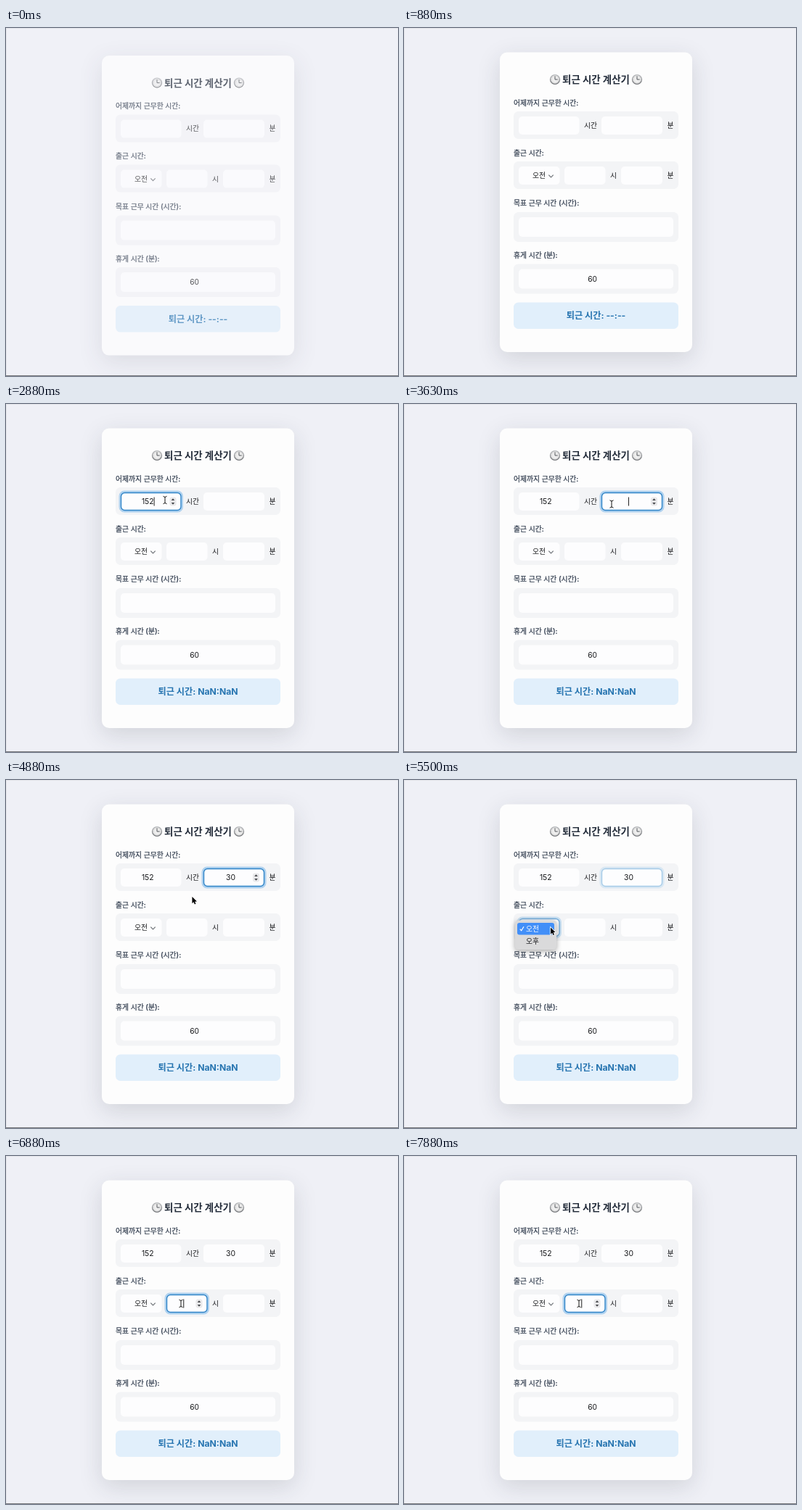
An HTML page with a canvas for the animation above (8 s loop, 540 by 480 pixels).

```html
<!DOCTYPE html>
<html lang="ko">
<head>
<meta charset="utf-8">
<style>
html, body { margin: 0; width: 540px; height: 480px; overflow: hidden; background: #eff0f6; }
canvas { display: block; }
</style>
</head>
<body>
<canvas id="stage" width="540" height="480"></canvas>
<script>
const c = document.getElementById('stage').getContext('2d');
const LOOP = 8000, STEP = 125;
const BG = '#eff0f6', INK = '#17181b', FIELD = '#fdfdfe';
const FAMILY = 'Inter, "Noto Sans CJK KR", "Noto Sans CJK", sans-serif';

// x, y, width, height; focus and blur times; [time, text] keystrokes
const days = { x: 158, y: 122, w: 83.5, h: 25, on: 1750, off: 3250, keys: [[2250, '1'], [2375, '15'], [2500, '152']] };
const mins = { x: 272, y: 122, w: 84, h: 25, on: 3250, off: 5375, keys: [[3875, '3'], [4125, '30']] };
const half = { x: 158, y: 191, w: 56.5, h: 25, on: 5375, off: 6625 };
const hour = { x: 221, y: 191, w: 56.5, h: 25, on: 6625, off: 9000, keys: [] };
const startMin = { x: 299, y: 191, w: 57, h: 25 };
const goal = { x: 158, y: 261, w: 213, h: 27 };
const rest = { x: 158, y: 332.5, w: 213, h: 27 };
const fields = [days, mins, half, hour, startMin, goal, rest];
const numeric = [days, mins, hour];
const MENU_OPEN = 5375, MENU_SHUT = 6250;

// pointer stops: time, x, y
const path = [
  [1000, 76, -16], [1125, 91, 2], [1625, 219, 132.5], [2875, 219, 132.5], [3250, 286, 138],
  [4625, 286, 138], [5250, 202, 203.5], [6250, 202, 203.5], [6500, 241, 203.5], [8000, 241, 203.5]
];

const clamp = v => Math.max(0, Math.min(1, v));
const ease = v => v * v * (3 - 2 * v);

function box(x, y, w, h, r, fill) {
  c.beginPath();
  c.roundRect(x, y, w, h, r);
  c.fillStyle = fill;
  c.fill();
}

function line(points, color, width) {
  c.beginPath();
  points.forEach(([x, y]) => c.lineTo(x, y));
  c.strokeStyle = color;
  c.lineWidth = width;
  c.stroke();
}

// y is the vertical middle of the glyphs
function text(s, x, y, size, color, weight = 400, align = 'center') {
  c.font = `${weight} ${size}px ${FAMILY}`;
  c.textAlign = align;
  c.fillStyle = color;
  c.fillText(s, x, y + size * 0.365);
}

function shadow(color, blur, dy) {
  c.shadowColor = color;
  c.shadowBlur = blur;
  c.shadowOffsetY = dy;
}

function clock(x, y) {
  const rim = c.createLinearGradient(x, y - 7, x, y + 7);
  rim.addColorStop(0, '#b9bbbe');
  rim.addColorStop(1, '#6c6e72');
  c.beginPath();
  c.arc(x, y, 7.1, 0, 7);
  c.fillStyle = rim;
  c.fill();
  c.beginPath();
  c.arc(x, y, 5.8, 0, 7);
  c.fillStyle = '#eeeeee';
  c.fill();
  for (let i = 0; i < 12; i++) {
    const a = i * Math.PI / 6;
    c.fillStyle = '#aaa';
    c.fillRect(x + 4.7 * Math.cos(a) - 0.4, y + 4.7 * Math.sin(a) - 0.4, 0.8, 0.8);
  }
  line([[x, y - 4.6], [x, y], [x + 3.6, y]], '#55585d', 1);
}

function ring(f, t) {
  const a = clamp((t - f.on) / 200) * (1 - clamp((t - f.off) / 200));
  if (!a) return;
  c.globalAlpha = a;
  c.beginPath();
  c.roundRect(f.x - 1, f.y - 1, f.w + 2, f.h + 2, 6);
  c.strokeStyle = 'rgba(66,153,225,.38)';
  c.lineWidth = 3;
  c.stroke();
  c.beginPath();
  c.roundRect(f.x + 0.5, f.y + 0.5, f.w - 1, f.h - 1, 5);
  c.strokeStyle = '#2f84c8';
  c.lineWidth = 1.4;
  c.stroke();
  c.globalAlpha = 1;
}

function spinner(f) {
  const x = f.x + f.w - 11.5, y = f.y + f.h / 2;
  box(x - 4.5, y - 6, 9, 12, 3, '#e9e9eb');
  for (const d of [-1, 1]) {
    c.beginPath();
    c.moveTo(x - 2.3, y + d * 1.5);
    c.lineTo(x + 2.3, y + d * 1.5);
    c.lineTo(x, y + d * 4.2);
    c.fillStyle = '#44464a';
    c.fill();
  }
}

function numberField(f, t, p) {
  const cx = f.x + f.w / 2 - 4.5, cy = f.y + f.h / 2;
  const typed = f.keys.filter(k => k[0] <= t).pop();
  const value = typed ? typed[1] : '';
  text(value, cx, cy, 10.4, INK);
  const active = t >= f.on && t < f.off;
  if (active || inside(f, p)) spinner(f);
  if (active && (t - (typed ? typed[0] : f.on)) % 1000 < 500) {
    const x = cx + (value ? c.measureText(value).width / 2 + 0.5 : 0);
    line([[x, cy - 6], [x, cy + 6]], '#222', 1);
  }
}

function inside(f, p) {
  return p && p.x > f.x && p.x < f.x + f.w && p.y > f.y && p.y < f.y + f.h;
}

function pointer(t) {
  const i = path.findIndex(k => k[0] > t);
  if (i < 1) return null;
  const [t0, x0, y0] = path[i - 1], [t1, x1, y1] = path[i];
  const k = ease((t - t0) / (t1 - t0));
  return { x: x0 + (x1 - x0) * k, y: y0 + (y1 - y0) * k };
}

function drawPointer({ x, y }, beam) {
  if (beam) {
    const stem = [[x, y - 4], [x, y + 4]];
    line(stem, '#fff', 2.4);
    line(stem, '#111', 1);
    for (const d of [-1, 1])
      line([[x - 2.5, y + d * 5.2], [x, y + d * 4], [x + 2.5, y + d * 5.2]], '#111', 1);
    return;
  }
  c.beginPath();
  [[0, 0], [0, 9.2], [2.1, 7.3], [3.5, 10.4], [5, 9.7], [3.7, 6.7], [6.5, 6.5]]
    .forEach(([dx, dy]) => c.lineTo(x + dx, y + dy));
  c.closePath();
  c.strokeStyle = '#fff';
  c.lineWidth = 1.6;
  c.stroke();
  c.fillStyle = '#000';
  c.fill();
}

function menu(t) {
  c.globalAlpha = 1 - clamp((t - MENU_SHUT + 125) / 250);
  shadow('rgba(0,0,0,.35)', 7, 2);
  box(153, 193.5, 57, 40.5, 4.5, '#dadadb');
  shadow('transparent', 0, 0);
  box(156, 197, 51, 16.5, 3, '#428ff8');
  line([[159.8, 205.6], [161.7, 207.8], [165, 202.3]], '#fff', 1.2);
  text('오전', 177, 205, 9.8, '#fff');
  text('오후', 177, 222, 9.8, INK);
  c.globalAlpha = 1;
}

function card(t, p) {
  shadow('rgba(40,45,60,.15)', 32, 9);
  box(132, 33.5, 265, 413.5, 10, '#fdfdfd');
  shadow('transparent', 0, 0);

  clock(208, 71);
  clock(321, 71);
  text('퇴근 시간 계산기', 264.5, 71, 13.45, '#232c3a', 700);

  [['어제까지 근무한 시간:', 103, 115, 38], ['출근 시간:', 172, 184, 38],
   ['목표 근무 시간 (시간):', 241.5, 254, 41], ['휴게 시간 (분):', 313.5, 325.5, 41]]
    .forEach(([s, y, top, h]) => {
      text(s, 151, y, 9.8, '#374253', 500, 'left');
      c.strokeStyle = '#374253';
      c.lineWidth = 0.25;
      c.strokeText(s, 151, y + 9.8 * 0.365);
      box(151, top, 227, h, 6.5, '#f3f4f6');
    });

  for (const f of fields) {
    box(f.x, f.y, f.w, f.h, 5, FIELD);
    if (f.on) ring(f, t);
  }
  text('시간', 257, 134, 9.8, INK);
  text('분', 367, 134, 9.8, INK);
  text('시', 288.5, 203.5, 9.8, INK);
  text('분', 367, 203.5, 9.8, INK);
  text('오전', 186, 203.5, 9.8, INK);
  line([[199.3, 202.7], [202.5, 206], [205.7, 202.7]], '#6f7379', 1.2);
  text('60', 259.5, 346, 10.2, INK);
  numeric.forEach(f => numberField(f, t, p));

  box(151, 378.5, 227, 36.5, 6.5, '#e1effb');
  const result = t < days.keys[0][0] ? '--:--' : 'NaN:NaN';
  text('퇴근 시간: ' + result, 264.5, 397, 12.2, '#2674b0', 700);
}

function draw(t) {
  const hiding = Math.pow(1 - clamp(t / 500), 2);
  const p = pointer(t);
  c.fillStyle = BG;
  c.fillRect(0, 0, 540, 480);

  c.save();
  c.translate(0, 4.6 * hiding);
  card(t, p);
  c.restore();

  // veil for the fade-in
  c.globalAlpha = 0.29 * hiding;
  c.fillStyle = BG;
  c.fillRect(0, 0, 540, 480);
  c.globalAlpha = 1;

  if (t >= MENU_OPEN && t < MENU_SHUT + 125) menu(t);
  const typing = (t >= 2250 && t < 2875) || (t >= 3875 && t < 4625);
  if (p && !typing) drawPointer(p, numeric.some(f => inside(f, p)));

  c.fillStyle = '#e4e5ea';
  c.fillRect(0, 0, 540, 1);
  c.fillRect(0, 0, 1, 480);
  c.fillStyle = '#77787c';
  c.fillRect(0, 479, 540, 1);
}

const start = performance.now();
function frame() {
  const t = (performance.now() - start) % LOOP;
  draw(Math.floor(t / STEP) * STEP);
  requestAnimationFrame(frame);
}
frame();
</script>
</body>
</html>
```
